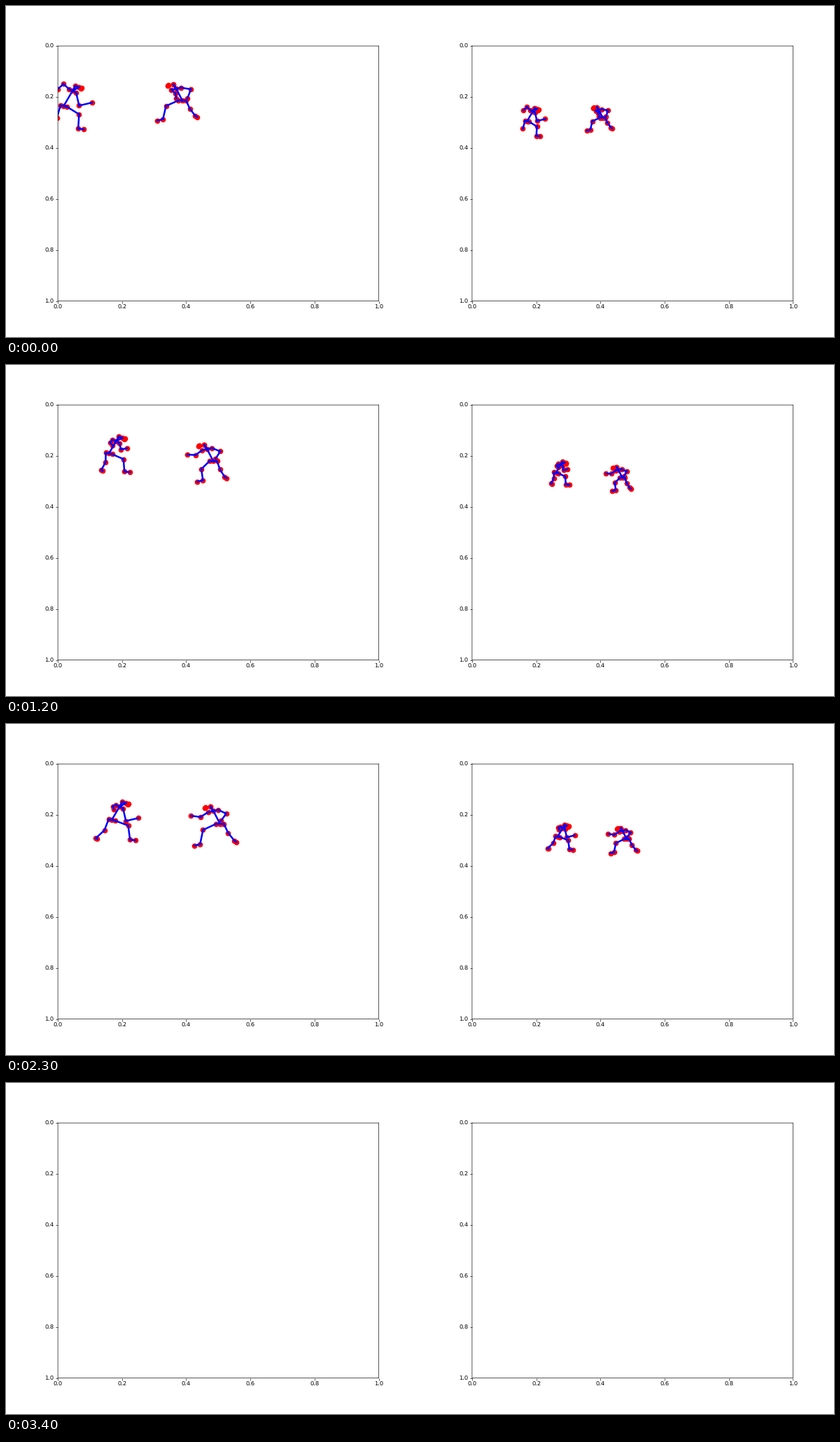
Write a matplotlib script that moves like this. It is 1183 px wide and 473 px high and loops after 3500 ms.

```python
import numpy as np
import matplotlib.pyplot as plt
from matplotlib.animation import FuncAnimation

W, H, DPI = 1183, 473, 64
PT = 72 / DPI                       # points per pixel
AX_W, AX_H, TOP = 458.4, 364.4, 57.1
LEFTS = (74.1, 665.9)
FRAMES, STEP = 35, 100

KEYS = [0, 7, 12, 16, 23, 27]       # frames of the key stances
BUMPS = [(10, -45, 2), (17.5, 22, 1.5), (25, -38, 2), (30, 26, 3)]  # camera sways


class Fighter:
    """A stick figure built from its stance: neck x, neck y, height,
    and sideways reach of each foot, the guarding and the jabbing hand."""

    def __init__(self, stances, facing, head, shoulder, hip, lean, tilt,
                 guard, jab, elbows, knees, toes):
        self.stances = np.array(stances, float)
        self.facing = facing
        self.head, self.shoulder, self.hip = map(np.array, (head, shoulder, hip))
        self.lean, self.tilt = lean, tilt
        self.guard, self.jab = guard, jab
        self.elbows, self.knees, self.toes = elbows, knees, np.array(toes)

    def joints(self, frame):
        x, y, height, foot_r, foot_l, guard, jab = (
            np.interp(frame, KEYS, track) for track in self.stances.T)
        neck = np.array([x, y])
        hip = neck + height * np.array([self.lean, 0.41])
        hands = [neck + (dx, base + slope * dx)
                 for dx, (base, slope) in ((guard, self.guard), (jab, self.jab))]
        if self.facing < 0:
            hands.reverse()
        feet = [neck + (foot_r, height - self.tilt),
                neck + (foot_l, height + self.tilt)]
        pts = [*(neck + self.head), neck]
        for side, hand, bend in zip((-1, 1), hands, self.elbows):
            pts += limb(neck + side * self.shoulder, hand, bend)
        pts.append(hip)
        for side, foot, bend, toe in zip((-1, 1), feet, self.knees, self.toes):
            pts += [*limb(hip + side * self.hip, foot, bend), foot + toe]
        return np.array(pts)


def limb(root, tip, bend):
    """Root, middle joint pushed sideways by a share of the span, and tip."""
    dx, dy = tip - root
    return [root, (root + tip) / 2 + bend * np.array([-dy, dx]), tip]


def chain(*ids):
    return list(zip(ids, ids[1:]))


CROWN, BROW, FACE, NECK, HIP = 0, 1, 2, 3, 10
BONES = (chain(NECK, CROWN, BROW, NECK) + chain(NECK, 4, 5, 6)
         + chain(NECK, 7, 8, 9) + chain(NECK, HIP)
         + chain(HIP, 11, 12, 13, 14) + chain(HIP, 15, 16, 17, 18))

fighters = [
    Fighter([(95, 121, 53, -35, 8, -21, 28),
             (158, 94, 32, -15, 14, -17, 9),
             (157, 109, 42, -21, 12, -5, 16),
             (192, 109, 48, -19, 16, 2, 15),
             (162, 118, 46, -34, 15, -8, 27),
             (178, 113, 51, -22, 9, 7, 13)],
            facing=1, head=[(4, -7), (9, -5), (12, -3)], shoulder=(5, 2.5),
            hip=(4.5, 1), lean=-0.24, tilt=1, guard=(8, 0.5), jab=(0, 0.6),
            elbows=(0.45, 0.5), knees=(-0.12, -0.3), toes=[(2, 1), (8, 1)]),
    Fighter([(243, 118, 41, -19, 27, 16, 0),
             (208, 105, 32, 18, 28, 14, -2),
             (287, 120, 42, -6, 25, 12, -28),
             (320, 124, 42, -6, 30, 8, -33),
             (296, 124, 45, -19, 30, 11, -32),
             (309, 122, 43, -24, 26, 13, -20)],
            facing=-1, head=[(-4, -6), (-4, -6), (-12, -4)], shoulder=(7, -1.5),
            hip=(5.5, 0), lean=0.21, tilt=-2.5, guard=(14, 0), jab=(14, 0.22),
            elbows=(-0.18, -0.6), knees=(0.25, 0.06), toes=[(-8, 2), (3, 2)]),
]


def sway(frame):
    return sum(dx * max(0, 1 - abs(frame - mid) / half) for mid, dx, half in BUMPS)


def near_view(fighter, frame):
    pts = fighter.joints(frame) + (sway(frame), 0)
    pts = (pts - (74, 57)) / (458, 364)
    pts[pts[:, 0] < -0.005] = np.nan        # joints out of view are lost
    return pts


def far_view(pts):
    return pts * (0.637, 0.646) + (0.16, 0.143)


plt.rcParams["text.hinting"] = "none"
fig = plt.figure(figsize=(W / DPI, H / DPI), dpi=DPI, facecolor="white")
panels = []
for left in LEFTS:
    ax = fig.add_axes([left / W, 1 - (TOP + AX_H) / H, AX_W / W, AX_H / H])
    ax.set(xlim=(0, 1), ylim=(1, 0))
    ax.tick_params(labelsize=8.2 * PT, length=2.9 * PT, pad=2.9 * PT,
                   width=0.66 * PT)
    for spine in ax.spines.values():
        spine.set(linewidth=0.66 * PT, snap=False)
    dots, = ax.plot([], [], "o", color="red", ms=7.7 * PT, mew=0, zorder=1)
    bones, = ax.plot([], [], color="blue", lw=2.5 * PT, zorder=2)
    panels.append((dots, bones))


def draw(frame):
    joints, lines = [np.empty((0, 2))], [(np.nan, np.nan)]
    if frame < FRAMES - 1:
        for fighter in fighters:
            p = near_view(fighter, frame)
            joints += [p, p[[FACE]] + (0.002, -0.003)]
            for a, b in BONES:
                lines += [p[a], p[b], (np.nan, np.nan)]
    near = np.vstack(joints), np.array(lines)
    for artists, view in zip(panels, (lambda pts: pts, far_view)):
        for artist, pts in zip(artists, near):
            artist.set_data(*view(pts).T)
    return [artist for pair in panels for artist in pair]


anim = FuncAnimation(fig, draw, frames=FRAMES, interval=STEP, repeat=True,
                     repeat_delay=0, blit=False)
plt.show()
```
